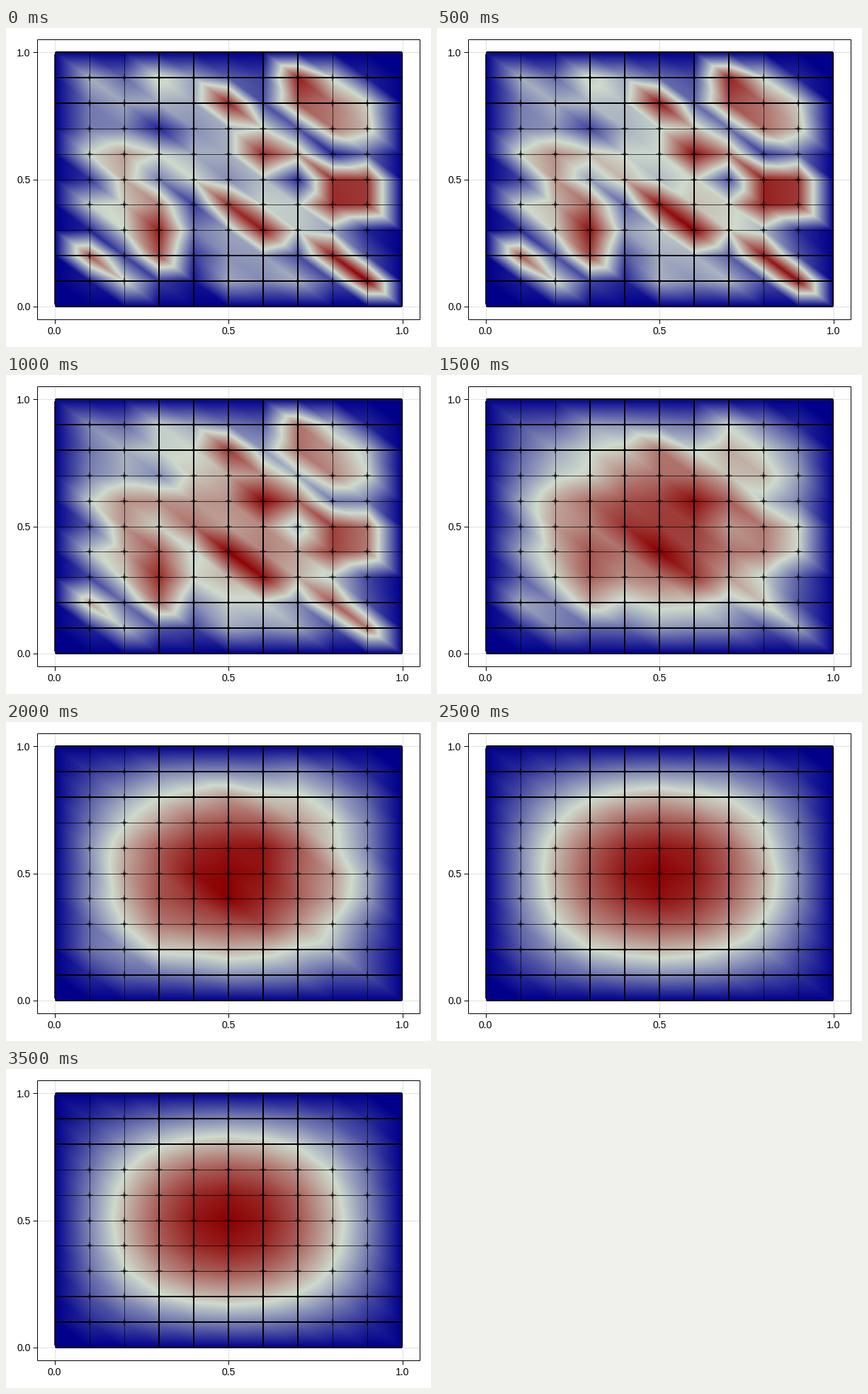
Animation, 600 px wide and 450 px high, one loop 4.5 s. Source, as a matplotlib script:

```python
import numpy as np
import matplotlib.pyplot as plt
from matplotlib.animation import FuncAnimation
from matplotlib.colors import LinearSegmentedColormap

WIDTH, HEIGHT, DPI = 600, 450, 100
PT = 72 / DPI  # points per pixel
LEFT, RIGHT, TOP, BOTTOM = 68.5, 559.5, 34, 393
BOX = (44, 584, 16, 411)
CELLS = 10
LAST_STEP = 7

# Interior node values in percent, top row first.
START = np.array([
    [40, 24, 53, 37, 22, 15, 93, 48, 8],
    [28, 38, 40, 38, 92, 18, 80, 72, 52],
    [28, 30, 8, 33, 40, 50, 20, 72, 58],
    [50, 64, 50, 40, 40, 90, 63, 8, 24],
    [12, 60, 29, 50, 32, 43, 10, 89, 87],
    [47, 54, 70, 14, 88, 48, 46, 90, 87],
    [8, 50, 93, 28, 38, 95, 46, 38, 8],
    [80, 15, 82, 12, 34, 36, 17, 94, 18],
    [6, 52, 14, 5, 38, 32, 40, 17, 100],
])
noise = np.pad(START[::-1] / 100, 1)
wave = np.sin(np.pi * np.linspace(0, 1, CELLS + 1))
mode = np.outer(wave, wave)

cmap = LinearSegmentedColormap.from_list(
    "heat", ["#00008b", "#cfdacd", "#8b0000"], N=1024)


def px(x):
    return LEFT + x * (RIGHT - LEFT)


def py(y):
    return BOTTOM + y * (TOP - BOTTOM)


# Cell index and offset of every pixel in the field.
cols, rows = np.arange(69, 560), np.arange(34, 393)
gx, gy = np.meshgrid((cols + 0.5 - LEFT) / (RIGHT - LEFT) * CELLS,
                     (BOTTOM - rows - 0.5) / (BOTTOM - TOP) * CELLS)
ix = np.clip(gx.astype(int), 0, CELLS - 1)
iy = np.clip(gy.astype(int), 0, CELLS - 1)
fx, fy = np.clip(gx - ix, 0, 1), np.clip(gy - iy, 0, 1)


def interpolate(nodes):
    """Linear interpolation on cells split along the falling diagonal."""
    a, b = nodes[iy, ix], nodes[iy, ix + 1]
    c, d = nodes[iy + 1, ix], nodes[iy + 1, ix + 1]
    lower = a + fx * (b - a) + fy * (c - a)
    upper = d + (1 - fx) * (c - d) + (1 - fy) * (b - d)
    return np.where(fx + fy <= 1, lower, upper)


def field(step):
    """Noise fading against the first eigenmode, scaled to its maximum."""
    nodes = noise + 0.04 * (4 ** min(step, LAST_STEP) - 1) * mode
    return interpolate(nodes / nodes.max())


fig = plt.figure(figsize=(WIDTH / DPI, HEIGHT / DPI), dpi=DPI, facecolor="white")
ax = fig.add_axes([0, 0, 1, 1])


def line(x0, y0, x1, y1, width=1, color="black", z=3, alpha=1):
    ax.plot([x0, x1], [y0, y1], color=color, lw=width * PT, zorder=z,
            alpha=alpha, solid_capstyle="butt")


def label(x, y, text, ha):
    ax.text(x, y, text, ha=ha, va="center_baseline", fontsize=14 * PT,
            family="Liberation Sans", color="black")


image = ax.imshow(field(0), cmap=cmap, vmin=0, vmax=1, aspect="auto",
                  interpolation="nearest", extent=(69, 560, 393, 34), zorder=2)

x0, x1, y0, y1 = BOX
for v in (0, 0.5, 1):
    line(px(v), y0, px(v), y1, color="#e0e0e0", z=1)
    line(x0, py(v), x1, py(v), color="#e0e0e0", z=1)
    line(px(v), y1, px(v), y1 + 6)
    line(x0 - 6, py(v), x0, py(v))
    label(px(v), 427, f"{v:.1f}", "center")
    label(34.5, py(v), f"{v:.1f}", "right")
for x in (x0, x1):
    line(x, y0, x, y1)
for y in (y0, y1):
    line(x0, y, x1, y)

# Mesh lines: some heavy, the others fine.
for i in range(1, CELLS):
    heavy_x, heavy_y = 3 <= i <= 7, i in (1, 2, 8, 9)
    x, y = px(i / CELLS), py(i / CELLS)
    line(x, TOP, x, BOTTOM, 2 if heavy_x else 1, alpha=1 if heavy_x else 0.7)
    line(LEFT, y, RIGHT, y, 2 if heavy_y else 1, alpha=1 if heavy_y else 0.7)
    for j in range(1, CELLS):
        node_y = py(j / CELLS)
        line(x - 5, node_y, x + 5, node_y, 2, alpha=0.4)
        line(x, node_y - 5, x, node_y + 5, 2, alpha=0.4)
        line(x - 2, node_y, x + 2, node_y, 4, alpha=0.4)
for y in (TOP, BOTTOM):
    line(LEFT + 1, y, RIGHT - 1, y, 2)
for x in (LEFT + 0.5, RIGHT - 0.5):
    line(x, TOP + 3, x, BOTTOM - 3, 1.6)

ax.set_xlim(0, WIDTH)
ax.set_ylim(HEIGHT, 0)
ax.axis("off")


def update(step):
    image.set_data(field(step))
    return [image]


anim = FuncAnimation(fig, update, frames=9, interval=500, repeat=True,
                     repeat_delay=0, blit=False)
plt.show()
```
